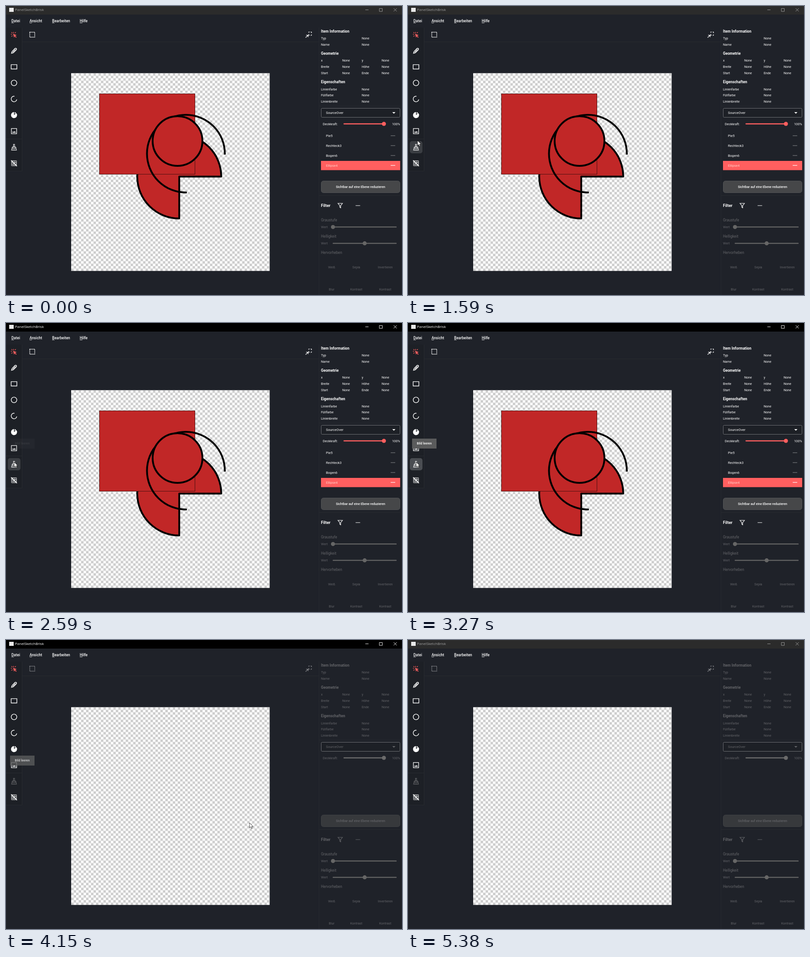
Animation, 875 px wide and 640 px high, one loop 5510 ms. Source, as an HTML page:

```html
<!DOCTYPE html>
<html lang="de">
<head>
<meta charset="utf-8">
<title>PanelSketchBrisk</title>
<style>
html, body { margin: 0; width: 100%; height: 100%; overflow: hidden; background: #1f2229; }
svg { display: block; width: 875px; height: 640px; font-family: Roboto, sans-serif; }
.line { fill: none; stroke: currentColor; }
.rule { fill: none; stroke: #272a30; }
.key { text-decoration: underline; text-decoration-thickness: 0.5px; }
</style>
</head>
<body>
<svg id="stage" viewBox="0 0 875 640"></svg>
<script>
const LOOP = 5510, FOCUS = 1730, PRESS = 3160, CLEAR = 3330, SHRINK = 3350, GONE = 3680, BLUR = 5380;
const TIP_IN = 2565, TIP_OUT = 3930, FADE = 500;
const DIM = '#636468', CORAL = '#ff5f5f', CELL = 5.475;
const stage = document.getElementById('stage');

const text = (x, y, s, size = 7.1, more = '') =>
  `<text x="${x}" y="${y + size * 0.36}" font-size="${size}" fill="currentColor" ${more}>${s}</text>`;
const bold = (x, y, s, size = 8.3) => text(x, y, s, size, 'font-weight="700"');
const mid = (x, y, s, more = '') => text(x, y, s, 7, 'text-anchor="middle" ' + more);
const path = (d, width = 1.4, more = '') => `<path class="line" d="${d}" stroke-width="${width}" ${more}/>`;
const rule = d => `<path class="rule" d="${d}"/>`;
const rect = (x, y, w, h, fill, more = '') =>
  `<rect x="${x}" y="${y}" width="${w}" height="${h}" fill="${fill}" ${more}/>`;
const group = (id, body, more = '') => `<g id="${id}" ${more}>${body}</g>`;

const titleBar = () => rect(0, 0, 875, 19, '#000', 'id="bar"') + group('caption',
  rect(7, 4, 10, 9, '#e8e8e8') +
  text(20, 8.5, 'PanelSketchBrisk', 8, 'font-family="Open Sans, sans-serif"') +
  path('M794 8.5h7M825 5.500h6.500v6.500h-6.500zM856.500 5l7 7m0-7l-7 7', 0.9));

const menu = () => [[12, 'Datei'], [52, 'Ansicht'], [102, 'Bearbeiten'], [163, 'Hilfe']].map(([x, s]) =>
  text(x, 33, `<tspan class="key">${s[0]}</tspan>${s.slice(1)}`, 8.2, 'font-weight="500"')).join('');

const toolY = i => 63.5 + 35.6 * i;
const icons = [
  `<g color="${CORAL}">${path('M-1-3v-3M-4-1h-3M-3.5-3.5l-2-2M2-3.5l2-2M-3.5 2l-2 2', 1.2)}
   <path d="M-2-2l8 3-3.300 1.500 3 3-1.200 1.200-3-3-1.300 3z" fill="${CORAL}"/></g>`,
  path('M-5.500 5.500l1-3.500 6-6.500q2-2 3.500-.5t-.500 3.500l-6 6zM-2.500 3l5.500-6', 1.5),
  path('M-6.300-4.800h12.600v9.600h-12.600z', 1.4),
  '<circle class="line" r="6.200" stroke-width="1.400"/>',
  path('M1-6.100A6.200 6.200 0 1 0 6.100 1', 1.4),
  '<path d="M0 0V-6.700A6.700 6.700 0 1 0 5-4.500z" fill="currentColor"/><path d="M1.500-2.500V-6.500A6.500 6.500 0 0 1 4.500-5z" fill="currentColor"/>',
  path('M-5.800-5.800h11.600v11.600h-11.600z', 1.3) +
    '<path d="M-4 3.500l2-3 1.500 2 2-2.700 2.700 3.700z" fill="currentColor"/>',
  path('M-1.200-.8v-5.700h2.400v5.700M-4.300 2.200q0-3 2.300-3h4q2.300 0 2.300 3zM-4.300 2.200l-1.200 4.300h11l-1.200-4.300M-2 6.500v-2M1.500 6.500v-2', 1.1),
  path('M-5.500-5.500h11v11h-11zM-1.800-5.500v11M1.800-5.500v11M-5.500-1.800h11M-5.500 1.800h11', 0.9) + path('M-6.500-6.500l13 13', 1.6)
];
const toolbar = () => rect(0, 48, 35, 317, '#1d2026') +
  rule('M35.500 48V365.500H0M0 294.500H35M36 79.500H691') +
  rect(4, 0, 28, 27, '#3b3e43', 'id="hover" rx="5"') +
  icons.map((d, i) => `<g id="tool${i}" transform="translate(17.7 ${toolY(i)})">${d}</g>`).join('');

const canvas = () => rect(144, 148.7, 438.6, 438, 'url(#checker)') + group('shapes', `
  <path d="M382.800 377.800H475.600A92.800 92.800 0 1 0 382.800 470.600Z" stroke-width="4" stroke-linejoin="round"/>
  <rect x="206.500" y="194.500" width="211" height="178" stroke="#4b1010"/>
  <path d="M483.500 327A86 86 0 1 0 397.500 413" fill="none" stroke-width="4" stroke-linecap="square"/>
  <circle cx="379" cy="299" r="55" stroke-width="4"/>`, 'fill="#c12727" stroke="#000"');

const topIcons = () => group('actions',
  path('M52.500 58h11v11h-11z', 1.4, 'stroke-dasharray="2 1"') +
  path('M662 70l5-5M663 64.500h4.500v4.500M669 59v-1.500h2M673 57.500h2V60M675 63v2h-2M669 62v3h2', 1.2));

const info = () => {
  const none = (x, y) => text(x, y, 'None');
  const pairs = [['Typ', 71.7], ['Name', 85.6], ['Linienfarbe', 184], ['Füllfarbe', 197.8], ['Linienbreite', 211.6]];
  const quads = [['x', 'y', 120.6], ['Breite', 'Höhe', 134.6], ['Start', 'Ende', 148.6]];
  return bold(696, 56.3, 'Item Information') + bold(696, 105.3, 'Geometrie') + bold(696, 168.3, 'Eigenschaften') +
    pairs.map(([s, y]) => text(696, y, s) + none(786, y)).join('') +
    quads.map(([a, b, y]) => text(696, y, a) + none(743, y) + text(786, y, b) + none(830, y)).join('');
};

const blend = () => rect(696.5, 226.5, 174, 20, '#1d2026', 'rx="2" stroke="#6e7074"') +
  text(707, 236.3, 'SourceOver', 7.5) + '<path d="M853.500 235h7l-3.500 3.500z" fill="currentColor"/>' +
  text(700, 261, 'Deckkraft:', 7.3) + text(853, 261, '100%', 7.3) +
  `<g id="opacity">${path('M747 261H835', 2.6, 'stroke-linecap="round"')}<circle cx="835" cy="261" r="4.500" fill="currentColor"/></g>`;

const layerY = i => 287.3 + 21.9 * i;
const layers = () => ['Pie5', 'Rechteck3', 'Bogen6', 'Ellipse4'].map((s, i) => {
  const chosen = i === 3, y = layerY(i);
  return group('layer' + i,
    (chosen ? rect(696, 343, 175, 20.5, CORAL) : '') + text(707, y, s, 7.4) +
    `<path d="M850 ${y}h10" stroke="${chosen ? '#fff' : '#77797c'}" stroke-width="1.200"/>`);
}).join('');

const slider = (y, knob) => text(696, y, 'Wert') + `<g color="#666">${path(`M723 ${y}H862`, 2.4, 'stroke-linecap="round"')}
  <circle cx="${knob}" cy="${y}" r="4.500" fill="currentColor"/></g>`;
const filters = () => [[474, 'Graustufe'], [510.3, 'Helligkeit'], [546.5, 'Hervorheben']]
  .map(([y, s]) => text(696, y, s, 8.2)).join('') + slider(489.4, 722.5) + slider(525.6, 792.5) +
  [['Weiß', 'Sepia', 'Invertieren', 578], ['Blur', 'Kontrast', 'Kontrast', 627]].map(([a, b, c, y]) =>
    mid(719.5, y, a) + mid(774, y, b) + mid(838, y, c)).join('');

stage.innerHTML = `<defs>
  <pattern id="checker" x="144" y="149" width="${CELL * 2}" height="${CELL * 2}" patternUnits="userSpaceOnUse">
    ${rect(0, 0, CELL * 2, CELL * 2, '#fff')}${rect(CELL, 0, CELL, CELL, '#cdcdcd')}${rect(0, CELL, CELL, CELL, '#cdcdcd')}
  </pattern></defs>` +
  rect(0, 0, 875, 640, '#1f2229') + titleBar() +
  `<g color="#fff">${menu()}${toolbar()}</g>` + canvas() + topIcons() +
  rule('M691.500 48V640M692 221.500H871M692 419.500H871') +
  group('panel', info() + blend() +
    rect(696.5, 387.5, 174, 26, '#464749', 'id="button" rx="5" stroke="#505255"') +
    mid(783.5, 400.3, 'Sichtbar auf eine Ebene reduzieren', 'font-weight="500"') +
    bold(696, 442, 'Filter', 9) + path('M733.500 437h10l-4 5v5l-2-1.500V442zM772.500 442h10', 1.2)) +
  layers() + `<g color="${DIM}">${filters()}</g>` +
  group('tip', rect(9, 256, 54, 22, '#5a5b5c') + mid(36, 266, 'Bild leeren', 'font-weight="500"'), 'color="#fff"') +
  group('cursor', '<path d="M0 0V11L2.600 8.700 4.400 12.700 6.200 11.900 4.500 8H8Z" fill="#fff" stroke="#000" stroke-width=".7"/>');

const $ = id => document.getElementById(id);
const clamp = v => Math.max(0, Math.min(1, v));
const show = (id, on) => { $(id).style.display = on ? '' : 'none'; };
const tint = (id, color) => { $(id).style.color = color; };

// time, x, y
const arrive = [[330, 791, 606], [540, 480, 380], [680, 230, 210], [750, 130, 160], [820, 66, 143],
  [890, 49, 155], [1030, 32, 193], [1380, 22, 275], [1590, 21, 298], [1800, 18, 308]];
const leave = [[3870, 18, 308], [3940, 60, 312], [4010, 200, 335], [4080, 390, 370], [4150, 538, 405],
  [4220, 650, 490], [4290, 720, 570], [4360, 745, 606]];

function along(points, t) {
  if (t <= points[0][0]) return points[0].slice(1);
  for (let i = 1; i < points.length; i++) {
    const [t0, x0, y0] = points[i - 1], [t1, x1, y1] = points[i];
    if (t <= t1) {
      const k = (t - t0) / (t1 - t0);
      return [x0 + (x1 - x0) * k, y0 + (y1 - y0) * k];
    }
  }
  return points[points.length - 1].slice(1);
}
const step = (t, from) => from + Math.floor((t - from) / 70) * 70;

// Ease-out on entry, ease-in on exit
function tipOpacity(t) {
  const enter = clamp((step(t, 2590) - TIP_IN) / FADE), exit = clamp((step(t, 3940) - TIP_OUT) / FADE);
  return 1 - (1 - enter) ** 2 - exit ** 2;
}

function draw(t) {
  const cleared = t >= CLEAR, active = t >= FOCUS && t < BLUR, ink = cleared ? DIM : '#fff';
  $('bar').setAttribute('fill', active ? '#000' : '#2b2b2b');
  tint('caption', active ? '#fff' : '#a0a0a0');
  tint('panel', ink);
  tint('actions', cleared ? '#85868a' : '#fff');
  tint('tool7', cleared ? '#696a6d' : '#fff');
  tint('opacity', cleared ? '#6b6b6b' : CORAL);
  $('button').setAttribute('fill', cleared ? '#37393c' : '#464749');
  $('button').setAttribute('stroke', cleared ? '#3e4043' : '#505255');
  show('shapes', !cleared);

  const scale = 1 - clamp((step(t, CLEAR) - SHRINK) / (GONE - SHRINK));
  for (let i = 0; i < 4; i++) {
    const y = layerY(i);
    show('layer' + i, t < GONE);
    tint('layer' + i, i < 3 ? ink : cleared ? '#d87672' : '#ffd0c8');
    $('layer' + i).setAttribute('transform', `translate(783.5 ${y}) scale(${scale}) translate(-783.5 ${-y})`);
  }

  const [x, y] = t < 3870 ? along(arrive, step(t, 330)) : along(leave, step(t, 3940));
  show('cursor', t >= 330 && t < 4430);
  $('cursor').setAttribute('transform', `translate(${x} ${y})`);
  const over = icons.findIndex((_, i) => Math.abs(y - toolY(i)) <= 17.8);
  show('hover', t >= 330 && !cleared && x < 34 && over >= 0);
  $('hover').setAttribute('y', toolY(over) - 13.5);
  $('hover').setAttribute('fill', t >= PRESS ? '#4a4d52' : '#3b3e43');
  $('tip').setAttribute('opacity', clamp(tipOpacity(t)));
}

const start = performance.now();
function tick(now) {
  draw(Math.max(0, now - start) % LOOP);
  requestAnimationFrame(tick);
}
draw(0);
requestAnimationFrame(tick);
</script>
</body>
</html>
```
